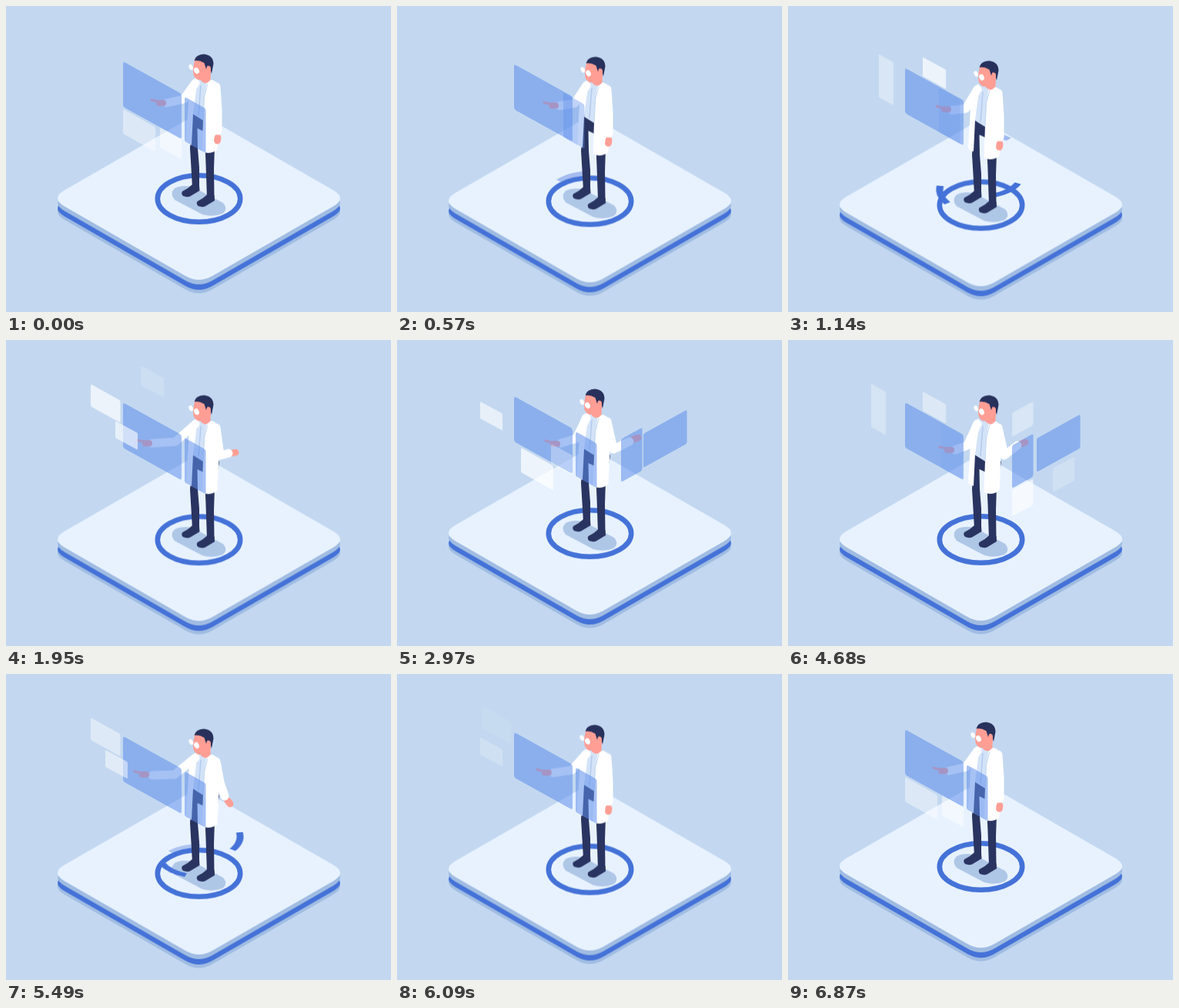
Recreate the animation shown at these times as an HTML page without scripts. Size 500 by 398 pixels, loop 6.9 s.

```html
<!DOCTYPE html>
<html lang="en">
<head>
<meta charset="utf-8">
<title>Hologram desk</title>
<style>
html, body { margin: 0; width: 100%; height: 100%; overflow: hidden; background: #c3d8f0; }
svg { display: block; width: 100vw; height: 100vh; }

.bob { animation: bob 1725ms -110ms cubic-bezier(.37,0,.63,1) infinite alternate; }
@keyframes bob { to { transform: translateY(10.2px); } }

.loop { animation: 6900ms ease-in-out infinite; }
.skin { stroke: #ff9e95; fill: none; stroke-linecap: round; }
.sleeve { stroke: #fff; stroke-width: 11; fill: none; stroke-linecap: round; stroke-linejoin: round; }
.glass { fill: #5c8cea; fill-opacity: .54; }
.card { fill: #fff; }

/* arcs climb in a spiral, one after another */
.rise, .spin { animation: rise 6900ms var(--d, 0ms) linear infinite both; }
.spin { animation-name: spin; }
@keyframes rise {
  0%, 7.39% { transform: none; opacity: 0; }
  9.5%, 14.6% { opacity: 1; }
  16.5% { opacity: .45; }
  19.71% { transform: translateY(-85px); opacity: 0; }
  19.72%, 72.61% { transform: none; opacity: 0; }
  74.7%, 79.8% { opacity: 1; }
  81.7% { opacity: .45; }
  84.93%, 100% { transform: translateY(-85px); opacity: 0; }
}
@keyframes spin {
  0%, 7.39% { transform: rotate(255deg); }
  19.71% { transform: rotate(-213deg); }
  19.72%, 72.61% { transform: rotate(255deg); }
  84.93%, 100% { transform: rotate(-213deg); }
}

.head { animation-name: head; }
@keyframes head {
  0%, 4%, 28.26%, 50%, 79.57%, 100% { transform: none; }
  16.52%, 67.83% { transform: translate(4px, .3px); }
}

.armL { animation-name: armL; }
@keyframes armL {
  0%, 94%, 100% { d: path("M246 100L231 121L209 126"); }
  16.52% { d: path("M246 100L231 125L213 127"); }
  28.26% { d: path("M246 100L220 123L190 125"); }
  43.04% { d: path("M246 100L233 127L213 133"); }
  67.83% { d: path("M246 100L233 128L217 134"); }
  79.57% { d: path("M246 100L219 122L190 123"); }
}
.handL { animation-name: handL; }
@keyframes handL {
  0%, 94%, 100% { transform: none; }
  16.52% { transform: translate(4px, 0); }
  28.26% { transform: translate(-18px, -1px); }
  43.04% { transform: translate(4px, 8px); }
  67.83% { transform: translate(8px, 8px); }
  79.57% { transform: translate(-22px, -4px); }
}
.armR { animation-name: armR; }
@keyframes armR {
  0%, 18%, 88%, 100% { d: path("M273 105L275 135L275 162"); }
  28.26% { d: path("M273 105L278 141L289 138"); }
  38%, 43.04% { d: path("M273 105L281 141L302 131"); }
  67.83% { d: path("M273 105L281 141L298 128"); }
  79.57% { d: path("M273 105L278 132L284 150"); }
}
.handR { animation-name: handR; }
@keyframes handR {
  0%, 18%, 88%, 100% { d: path("M275 171L274.500 175"); }
  28.26% { d: path("M292 138L298 137"); }
  38%, 43.04% { d: path("M307 128L313 126"); }
  67.83% { d: path("M303 126L308 124"); }
  79.57% { d: path("M288 156L291 160"); }
}

.side { animation-name: side; }
@keyframes side {
  0%, 5%, 28.26%, 52%, 79.57%, 100% { transform: none; opacity: 1; }
  12%, 16.52% { transform: translate(-36px, -20px); opacity: .35; }
  67.83% { transform: translate(-33px, -18px); opacity: .2; }
}
.a { animation-name: a; }
@keyframes a {
  0%, 95%, 100% { transform: none; opacity: .42; }
  6% { transform: translate(0, 8px); opacity: 0; }
  36% { transform: translate(20px, 11px); opacity: 0; }
  43.04% { transform: translate(9px, 5px); opacity: .72; }
  50% { transform: none; opacity: 0; }
  88% { transform: translate(12px, 7px); opacity: 0; }
}
.b { animation-name: b; }
@keyframes b {
  0%, 95%, 100% { transform: none; opacity: .5; }
  6% { transform: translate(0, 8px); opacity: 0; }
  37% { transform: translate(0, -30px); opacity: 0; }
  43.04% { transform: translate(0, -24px); opacity: .3; }
  49% { transform: none; opacity: .5; }
  54% { transform: none; opacity: 0; }
  89% { transform: translate(0, -24px); opacity: 0; }
}
.c { animation-name: c; }
@keyframes c {
  0%, 23% { transform: translate(46px, 24px); opacity: 0; }
  28.26% { transform: translate(34px, 17px); opacity: .6; }
  37%, 43.04% { transform: none; opacity: .6; }
  50% { transform: none; opacity: 0; }
  74% { transform: translate(34px, 18px); opacity: 0; }
  79.57% { transform: translate(21px, 11px); opacity: .5; }
  85% { transform: none; opacity: .5; }
  91%, 100% { transform: none; opacity: 0; }
}
.d { animation-name: d; }
@keyframes d {
  0%, 22%, 73% { transform: translate(0, 15px); opacity: 0; }
  28.26% { transform: none; opacity: .68; }
  34%, 90%, 100% { transform: translate(0, -12px); opacity: 0; }
  79.57%, 83% { transform: none; opacity: .45; }
}
.e { animation-name: e; }
@keyframes e {
  0%, 9%, 60% { transform: translate(0, 14px); opacity: 0; }
  16.52%, 20% { transform: none; opacity: .7; }
  28.26% { transform: translate(0, -34px); opacity: .15; }
  31% { transform: translate(0, -36px); opacity: 0; }
  67.83%, 71% { transform: none; opacity: .42; }
  78%, 100% { transform: translate(0, -30px); opacity: 0; }
}
.f { animation-name: f; }
@keyframes f {
  0%, 10% { transform: translate(24px, 13px); opacity: 0; }
  16.52% { transform: translate(10px, 6px); opacity: .35; }
  23% { transform: none; opacity: 0; }
  60% { transform: translate(16px, 9px); opacity: 0; }
  67.83% { transform: none; opacity: .3; }
  74%, 100% { transform: translate(-5px, -3px); opacity: 0; }
}
.near { animation-name: near; }
@keyframes near {
  0%, 32% { transform: translate(-6px, 3px); opacity: 0; }
  39%, 70% { transform: none; opacity: 1; }
  76%, 100% { transform: translate(-6px, 3px); opacity: 0; }
}
.far { animation-name: far; }
@keyframes far {
  0%, 34% { transform: translate(-24px, 13px); opacity: 0; }
  42%, 43.04% { transform: none; opacity: 1; }
  50%, 68% { transform: translate(3px, -2px); opacity: 1; }
  75%, 100% { transform: translate(-24px, 13px); opacity: 0; }
}
.pop { animation-name: pop; }
@keyframes pop {
  0%, 54% { transform: translateY(var(--y)); opacity: 0; }
  64%, 68% { transform: none; opacity: 1; }
  74%, 100% { transform: translateY(var(--y)); opacity: 0; }
}
</style>
</head>
<body>
<svg viewBox="0 0 500 398">
  <defs>
    <path id="slab" d="M233 351Q250.500 361 268 351L425 260.400Q443 250 425 239.600L268 149Q250.500 139 233 149L76 239.600Q58 250 76 260.400Z"/>
    <path id="shoe" d="M229 241Q237 237 242 232L251 233L251.500 240L239 247.500Q235 249 230 247Q227 244 229 241Z"/>
    <circle id="arc" r="53.500" pathLength="360" stroke-dasharray="45 315"/>
  </defs>

  <g class="bob">
    <use href="#slab" y="17.500" fill="#a0bce2"/>
    <use href="#slab" y="13" fill="#4472d8"/>
    <use href="#slab" y="6" fill="#a0bce2"/>
    <use href="#slab" fill="#e8f2ff"/>

    <path d="M219 237Q228 232 242 235L282 256Q289 264 281 270Q268 275 255 271L219 252Q212 244 219 237Z" fill="#afc7e7"/>
    <g fill="none" stroke="#4472d8">
      <ellipse cx="250.500" cy="250.500" rx="53.700" ry="30.300" stroke-width="6.600"/>
      <g stroke-width="9">
        <g class="rise"><g transform="translate(250.500 250.500) scale(1 .57)"><use href="#arc" class="spin"/></g></g>
        <g class="rise" style="--d:215ms"><g transform="translate(250.500 250.500) scale(1 .57)"><use href="#arc" class="spin" style="--d:215ms"/></g></g>
        <g class="rise" style="--d:430ms"><g transform="translate(250.500 250.500) scale(1 .57)"><use href="#arc" class="spin" style="--d:430ms"/></g></g>
      </g>
    </g>

    <g fill="#2a3460">
      <use href="#shoe"/>
      <use href="#shoe" x="19.500" y="13"/>
      <path d="M241.500 137L258 147L257 163L248.500 159L249 185L251 210L251 236L242 236L239 185Z"/>
      <path d="M258.500 182L271 182L270 212L270.500 250L261 250L259.500 205Z"/>
      <path d="M274 146L277 149L275.500 159L273 160Z"/>
    </g>

    <path d="M246 95L263 99L258 150L242 140Z" fill="#d3e3f8"/>
    <path d="M253 103L250 142" stroke="#b3cbee" stroke-width="1.500"/>
    <path class="loop armL sleeve" d="M246 100L231 121L209 126"/>
    <path d="M248 93Q239 96 238 106L234 177Q237 181 241 180.500L243 140L247 110Z" fill="#fff"/>
    <path d="M261 97L268 96Q278 100 278 110L274.500 187Q264 194 254.500 189L256 148L258 116Z" fill="#fff"/>
    <path d="M262 101L257.500 118L256 148" fill="none" stroke="#c3d8f0" stroke-width="1"/>

    <g class="loop handL">
      <path class="skin" stroke-width="8" d="M204 126L199 126"/>
      <path class="skin" stroke-width="3.200" d="M199 124.500L189 122"/>
    </g>
    <path class="loop handR skin" stroke-width="8.800" d="M275 171L274.500 175"/>
    <path class="loop armR sleeve" d="M273 105L275 135L275 162"/>

    <g class="loop head">
      <path d="M253 88L266 82L265.500 96Q259 104 253 97Z" fill="#ff9e95"/>
      <path d="M245.500 69Q242 82 243.500 89Q246 97 254 96Q263 95 267 84L265 68Z" fill="#ff9e95"/>
      <path d="M244.500 71Q246 63 257 62.500Q269 63.500 269.500 75L267 88L264.500 79Q261.500 75 260 82L257.500 74Q251 70 244.500 71Z" fill="#27315c"/>
      <ellipse cx="263.500" cy="82" rx="2.500" ry="4" fill="#ff9e95"/>
      <g fill="#fff">
        <ellipse cx="240.300" cy="79.500" rx="2.600" ry="3.800" transform="rotate(-25 240.300 79.500)"/>
        <ellipse cx="247.500" cy="84" rx="3.200" ry="4.200" transform="rotate(-25 247.500 84)"/>
      </g>
    </g>

    <rect class="glass" width="76" height="59" rx="3" transform="matrix(1 .555 0 1 152 72)"/>
    <g class="loop side"><rect class="glass" width="27.500" height="58" rx="2.500" transform="matrix(1 .56 0 1 232 118)"/></g>
    <g class="loop near"><rect class="glass" width="27.500" height="56" rx="2.500" transform="matrix(1 -.56 0 1 291 128)"/></g>
    <g class="loop far"><rect class="glass" width="56.500" height="44" rx="2" transform="matrix(1 -.555 0 1 320 121)"/></g>

    <g class="card">
      <g class="loop a"><rect width="42" height="32" rx="2" transform="matrix(1 .56 0 1 152 134)"/></g>
      <g class="loop b"><rect width="28" height="26" rx="2" transform="matrix(1 .54 0 1 200 158)"/></g>
      <g class="loop c"><rect width="29" height="22" rx="1.500" transform="matrix(1 .54 0 1 108 79)"/></g>
      <g class="loop d"><rect width="38.500" height="29" rx="2" transform="matrix(1 .555 0 1 110 48)"/></g>
      <g class="loop e"><rect width="30" height="25" rx="1" transform="matrix(1 .55 0 1 175 58)"/></g>
      <g class="loop f"><rect width="19" height="56" rx="1" transform="matrix(1 .56 0 1 108 48)"/></g>
      <g class="loop pop" style="--y:14px"><rect width="27.500" height="31" rx="2" opacity=".35" transform="matrix(1 -.56 0 1 291 86)"/></g>
      <g class="loop pop" style="--y:-14px"><rect width="27.500" height="34" rx="2" opacity=".6" transform="matrix(1 -.53 0 1 291 186)"/></g>
      <g class="loop pop" style="--y:-10px"><rect width="28" height="31" rx="2" opacity=".22" transform="matrix(1 -.54 0 1 344 158)"/></g>
    </g>
  </g>
</svg>
</body>
</html>
```
